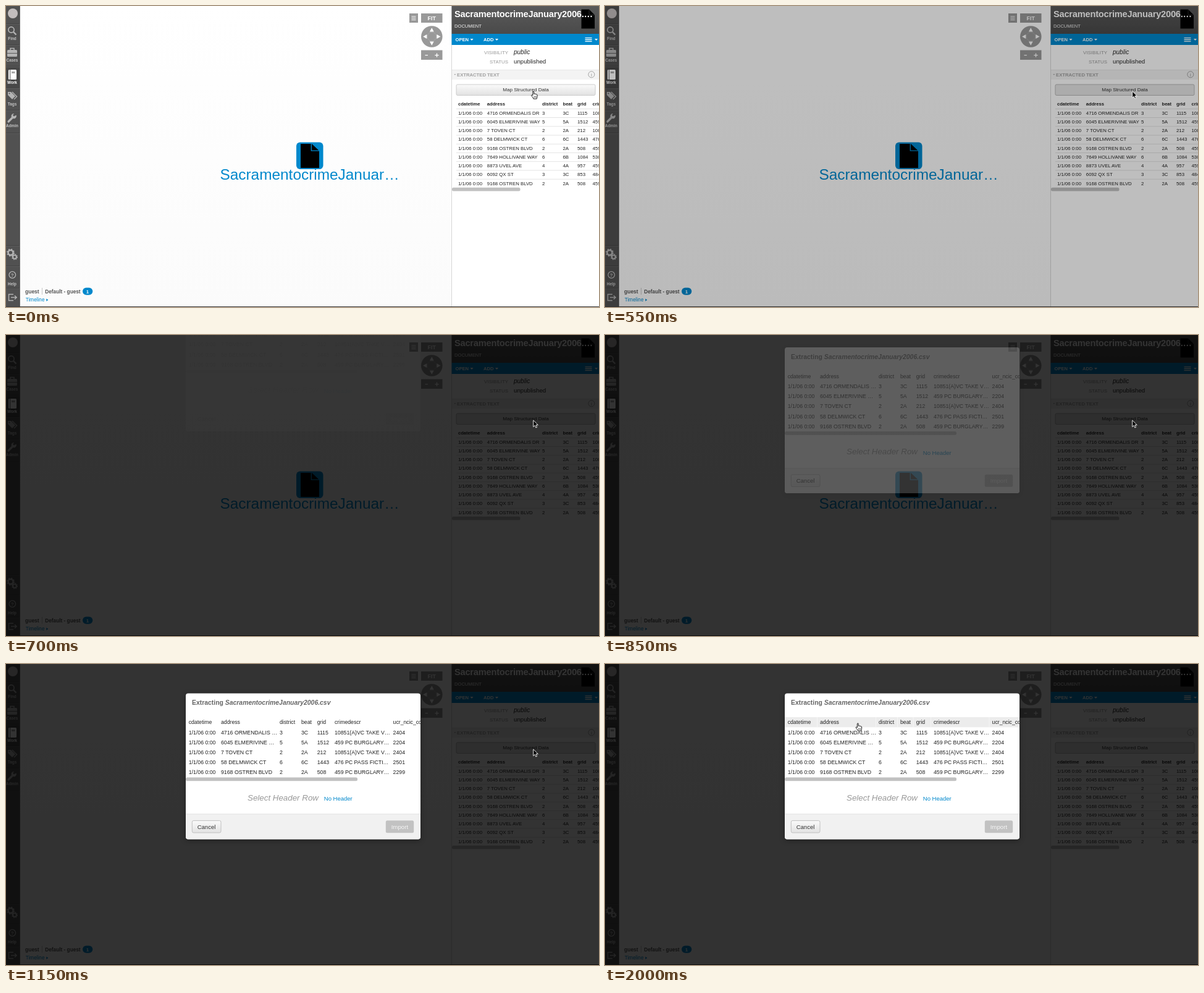
Animation, 960 px wide and 487 px high, one loop 2.05 s. Source, as an HTML page:

```html
<!DOCTYPE html>
<html lang="en">
<head>
<meta charset="utf-8">
<title>Map structured data</title>
<style>
html, body { margin: 0; width: 100%; height: 100%; overflow: hidden; background: #fdfdfd; }
svg { display: block; font-family: "Liberation Sans", Arial, sans-serif; }
text { white-space: pre; }
#modal { filter: drop-shadow(0 2px 4px rgba(0,0,0,.35)); }
</style>
</head>
<body>
<svg id="stage" width="960" height="487" viewBox="0 0 960 487">
  <defs>
    <linearGradient id="head" x2="0" y2="1"><stop stop-color="#5a5a5a"/><stop offset="1" stop-color="#4a4a4a"/></linearGradient>
    <linearGradient id="btn" x2="0" y2="1"><stop stop-color="#fafafa"/><stop offset="1" stop-color="#e2e2e2"/></linearGradient>
    <linearGradient id="paper" x2="0" y2="1"><stop stop-color="#fff"/><stop offset="1" stop-color="#fbfbfb"/></linearGradient>
    <clipPath id="sheet"><rect x="291" y="47.5" width="380" height="236" rx="4"/></clipPath>
  </defs>
  <g id="page"></g>
  <rect id="shade" width="960" height="487" opacity="0"/>
  <g id="modal" opacity="0"><g id="body" clip-path="url(#sheet)"></g></g>
  <g id="arrow">
    <path d="M0 0V10.6L2.5 8.3L4.1 12L5.9 11.2L4.3 7.6H7.6Z" fill="#000" stroke="#fff" stroke-width=".9"/>
  </g>
  <g id="hand">
    <path d="M-.9 .9C-.9-.4 1-.4 1 .9V4.4C1.6 3.6 2.7 3.9 2.8 4.6C3.5 4 4.5 4.3 4.6 5.1C5.4 4.7 6.3 5.1 6.3 6V8.4C6.3 10 5.5 10.6 5.4 12.2H.2C0 10.6-1.6 9.4-3 7.2C-3.6 6.1-2.4 5.4-1.6 6.2L-.9 6.9Z" fill="#fff" stroke="#000" stroke-width=".9"/>
    <path d="M1.2 8V10.4M2.8 8V10.4M4.4 8V10.4" stroke="#000" stroke-width=".6"/>
  </g>
</svg>
<script>
const $ = id => document.getElementById(id);
const BLUE = '#0088cc';

const text = (x, y, str, size, fill = '#222', more = '') =>
  `<text x="${x}" y="${y}" font-size="${size}" fill="${fill}" ${more}>${str}</text>`;
const rect = (x, y, w, h, fill, more = '') =>
  `<rect x="${x}" y="${y}" width="${w}" height="${h}" fill="${fill}" ${more}/>`;
const path = (d, fill = 'none', more = '') => `<path d="${d}" fill="${fill}" ${more}/>`;
const circle = (x, y, r, fill = 'none', more = '') =>
  `<circle cx="${x}" cy="${y}" r="${r}" fill="${fill}" ${more}/>`;
const caret = (x, y, fill) => path(`M${x} ${y}h5l-2.5 3z`, fill);
const line = (color, width = 1) => `stroke="${color}" stroke-width="${width}"`;
const BOLD = 'font-weight="bold"';
const MID = 'text-anchor="middle"';
const END = 'text-anchor="end"';
const ITALIC = 'font-style="italic"';

// address, district, beat, grid, crime, code
const rows = [
  ['4716 ORMENDALIS DR', 3, '3C', 1115, '10851(A)VC TAKE V…', 2404],
  ['6045 ELMERIVINE WAY', 5, '5A', 1512, '459 PC BURGLARY…', 2204],
  ['7 TOVEN CT', 2, '2A', 212, '10851(A)VC TAKE V…', 2404],
  ['58 DELMWICK CT', 6, '6C', 1443, '476 PC PASS FICTI…', 2501],
  ['9168 OSTREN BLVD', 2, '2A', 508, '459 PC BURGLARY…', 2299],
  ['7649 HOLLIVANE WAY', 6, '6B', 1084, '530 PC'],
  ['8873 UVEL AVE', 4, '4A', 957, '459 PC'],
  ['6092 QX ST', 3, '3C', 853, '484 PC'],
  ['9168 OSTREN BLVD', 2, '2A', 508, '459 PC']
].map(r => ['1/1/06 0:00', ...r]);
const heads = ['cdatetime', 'address', 'district', 'beat', 'grid', 'crimedescr', 'ucr_ncic_code'];

const cells = (list, xs, y, size, more) =>
  xs.map((x, i) => text(x, y, list[i], size, '#222', more)).join('');

function sidebar() {
  const g = '#b4b4b4';
  let s = rect(0, 0, 22.5, 487, '#515151') + rect(21.5, 0, 1, 487, '#444');
  s += rect(0, 97, 22, 35, '#474747');
  for (const y of [28, 62, 97, 132, 168, 205, 387, 420, 456])
    s += rect(0, y, 22, 1, '#434343') + rect(0, y + 1, 22, 1, '#5c5c5c');
  s += circle(11, 12, 8, '#c2bdbd');
  s += circle(8.5, 38.5, 4.6, 'none', line(g, 1.7)) + path('M12 42l4.5 4.5', 'none', line(g, 2.4));
  s += rect(2, 71, 16, 11, g, 'rx="1.5"') + path('M7 71v-2.5h6v2.5', 'none', line(g, 1.5)) +
    path('M2 76.5h16', 'none', line('#515151', .9));
  s += rect(4, 103, 13, 16, '#fff', 'rx="1.5"') + path('M6.6 103v16', 'none', line('#474747', .9)) +
    rect(9, 106, 5.5, 3, '#aaa');
  s += path('M3 139h5l7 7-5 5-7-7z', g) + path('M10 139l7.5 7.5-4.5 4.5', 'none', line(g, 1.4)) +
    circle(5.5, 141.5, 1, '#515151');
  s += path('M4 187l7-7', 'none', line(g, 3.2) + ' stroke-linecap="round"') +
    path('M16.6 176.5a4.2 4.2 0 1 1-3.6-2.6l-2 2.6 1.8 2z', g);
  s += circle(7.5, 399, 4, 'none', line(g, 2.4)) + circle(7.5, 399, 5.6, 'none', line(g, 1.6) + ' stroke-dasharray="2.2 2.2"');
  s += circle(14, 406, 2.9, 'none', line(g, 1.9)) + circle(14, 406, 4.3, 'none', line(g, 1.3) + ' stroke-dasharray="1.7 1.7"');
  s += circle(10.3, 435, 5.3, 'none', line(g, 1.3)) + text(10.3, 438, '?', 8, g, BOLD + MID.padStart(25));
  s += path('M12 466.5H4.5v10H12', 'none', line(g, 1.4)) + path('M8 471.5h9m-3-3l3.2 3-3.2 3', 'none', line(g, 1.4));
  const names = { Find: 54.5, Cases: 90, Work: 125.5, Tags: 160.5, Admin: 196, Help: 452 };
  for (const n in names)
    s += text(10, names[n], n, 6.4, n === 'Work' ? '#fff' : '#c4c4c4', `${BOLD} ${MID}`);
  return s;
}

function board() {
  const g = '#999';
  let s = rect(22, 0, 700, 487, 'url(#paper)');
  s += rect(653, 12, 14, 15, g) + path('M656.5 17h7m-7 2.7h7m-7 2.7h7', 'none', line('#fff'));
  s += rect(672, 12, 34.5, 15, g) + text(689.2, 22.8, 'FIT', 8.8, '#fff', `${BOLD} ${MID}`);
  s += circle(689.3, 49.5, 17.3, g) + circle(689.3, 49.5, 7.2, 'none', line('#ababab', 1));
  for (let a = 0; a < 360; a += 90)
    s += path('M689.3 35.3l3.4 6.2h-6.8z', '#fff', `transform="rotate(${a} 689.3 49.5)"`);
  s += rect(672, 71.5, 34.5, 15.5, g) + path('M678.5 79.6h4.4m11.4 0h6.4m-3.2-3.2v6.4', 'none', line('#fff', 1.4));
  s += rect(470, 220.5, 43.5, 43.5, BLUE, 'rx="6"') + path('M477 223h18l12 11.5v27.5h-30z', '#000') +
    path('M494.3 223v11.2h12.6', 'none', line(BLUE, 1.3)) + path('M495.6 224v9h10z', '#000');
  s += text(491.5, 281.3, 'SacramentocrimeJanuar…', 24.4, BLUE, MID);
  s += text(31, 465, 'guest', 8.5, '#555', BOLD) + rect(58, 456, .8, 11, '#bbb') +
    text(63.3, 465, 'Default - guest', 8.25, '#555', BOLD);
  s += rect(124, 455.8, 16.3, 11.6, BLUE, 'rx="5.8"') + text(132, 464.7, '1', 8, '#fff', `${BOLD} ${MID}`);
  s += text(31.8, 478.4, 'Timeline', 8.2, BLUE) + path('M65.3 473.4v4.4l3-2.2z', BLUE);
  return s;
}

function panel() {
  let s = rect(721, 0, 239, 487, '#fff') + rect(721, 0, .8, 487, '#ccc');
  s += rect(721.5, 0, 238.5, 45, 'url(#head)');
  s += path('M931.5 5.5h12.5l9 9v22h-21.5z', '#000') + path('M944 6v8.5h8.5', 'none', line('#333', .8));
  s += text(726, 18.3, 'SacramentocrimeJanuary2006.…', 14.6, '#fff', BOLD + ' letter-spacing="-.2"');
  s += text(726, 35.2, 'DOCUMENT', 7.6, '#f2f2f2');
  s += rect(721.5, 45, 238.5, 18, BLUE);
  s += text(727.5, 57, 'OPEN', 7.6, '#fff', BOLD) + caret(751.5, 53, '#fff');
  s += text(773, 57, 'ADD', 7.6, '#fff', BOLD) + caret(792, 53, '#fff');
  s += path('M937.5 51.6h11m-11 2.9h11m-11 2.9h11', 'none', line('#fff', 1.3)) + caret(953, 53, '#fff');
  s += text(813, 77.8, 'VISIBILITY', 7.9, '#999', END) + text(822, 78.2, 'public', 10, '#222', ITALIC);
  s += text(813, 92.8, 'STATUS', 7.9, '#999', END) + text(822, 93.2, 'unpublished', 9.7);
  s += rect(722, 103, 238, 16, '#f3f3f3') + rect(722, 103, 238, .7, '#e2e2e2');
  s += path('M725.3 110h3l-1.5 2z', '#aaa') + text(730, 114, 'EXTRACTED TEXT', 7.7, '#a0a0a0', BOLD);
  s += circle(947.8, 110.8, 5, 'none', line('#999', .9)) + text(947.8, 113.7, 'i', 8, '#888', MID);
  s += '<rect id="map" x="729" y="127" width="225" height="17.5" rx="2" stroke-width=".9"/>';
  s += text(841.5, 138.3, 'Map Structured Data', 8.1, '#333', MID);
  const xs = [732, 778.8, 868, 901.5, 925, 949.5];
  s += cells(heads, xs, 161.2, 7.6, BOLD);
  rows.forEach((r, i) => {
    const y = 175.8 + i * 14.22;
    s += rect(729, y - 9.8, 231, .8, '#ddd') + cells(r, xs, y, 7.8);
  });
  s += rect(722, 293.8, 110.5, 5.6, '#c1c1c1', 'rx="2.5"');
  return s;
}

function dialog() {
  const xs = [295.7, 348, 443, 478, 503.7, 532, 626.6];
  let s = rect(291, 47, 380, 237, '#fff');
  s += text(301, 66, 'Extracting <tspan font-style="italic">SacramentocrimeJanuary2006.csv</tspan>', 10.42, '#666', BOLD);
  s += '<g id="hover">' + rect(291, 86, 380, 16.3, '#ececec');
  for (const x of xs.slice(1)) s += rect(x - 5, 86, .8, 16.3, '#f8f8f8');
  s += '</g>' + cells(heads, xs, 97.1, 8.7);
  rows.slice(0, 5).forEach((r, i) => {
    const short = [...r];
    if (i < 2) short[1] = r[1].replace(/ \w+$/, ' …');
    s += cells(short, xs, 113.5 + i * 16.2, 8.75);
  });
  s += rect(291, 183.6, 278, 5.6, '#c1c1c1', 'rx="2.5"');
  s += text(391, 220.7, 'Select Header Row', 13.35, '#999', ITALIC) + text(514.8, 221, 'No Header', 9.5, BLUE);
  s += rect(291, 242.5, 380, 42, '#f1f1f1') + rect(291, 242.5, 380, .8, '#ddd');
  s += rect(301.3, 253.4, 46.7, 19.6, 'url(#btn)', 'rx="2.5" ' + line('#bbb', .9)) +
    text(324.5, 266.6, 'Cancel', 9.5, '#333', MID);
  s += rect(614.8, 253.2, 45.4, 20, '#c2c2c2', 'rx="2.5"') + text(637.4, 266.6, 'Import', 9.7, '#f6f6f6', MID);
  return s;
}

$('page').innerHTML = board() + sidebar() + panel() + rect(0, 486, 960, 1, '#3c3c3c');
$('body').innerHTML = dialog();

const clamp = v => Math.max(0, Math.min(1, v));

// CSS-style timing curve, solved by bisection
function bezier(x1, y1, x2, y2) {
  const at = (u, a, b) => 3 * u * (1 - u) * (1 - u) * a + 3 * u * u * (1 - u) * b + u ** 3;
  return x => {
    let lo = 0, hi = 1;
    for (let i = 0; i < 24; i++) {
      const m = (lo + hi) / 2;
      at(m, x1, x2) < x ? lo = m : hi = m;
    }
    return at(lo, y1, y2);
  };
}
const easeOut = bezier(0, 0, .58, 1);
const easeIn = bezier(.42, 0, 1, 1);

// time, x, y of the pointer tip
const route = [
  [1150, 853.7, 138], [1400, 850, 136], [1550, 832, 126], [1650, 787, 104],
  [1700, 738, 101], [1750, 672, 98], [1800, 585, 96], [1850, 508, 95],
  [1900, 453, 95], [1950, 421, 95], [2000, 409.3, 96]
];
function pointer(t) {
  if (t <= route[0][0]) return route[0].slice(1);
  const i = route.findIndex(p => p[0] >= t);
  const [t0, x0, y0] = route[i - 1], [t1, x1, y1] = route[i];
  const k = (t - t0) / (t1 - t0);
  return [x0 + (x1 - x0) * k, y0 + (y1 - y0) * k];
}

const LOOP = 2050, STEP = 50, CLICK = 300, FADE = 502, OPEN = 652;

function draw(t) {
  const clicked = t >= CLICK;
  $('map').setAttribute('fill', clicked ? '#e6e6e6' : 'url(#btn)');
  $('map').setAttribute('stroke', clicked ? '#b2b2b2' : '#c8c8c8');

  $('shade').setAttribute('opacity', .8 * clamp((t - FADE) / 150));
  const drop = -170 * (1 - easeOut(clamp((t - OPEN) / 300)));
  $('modal').setAttribute('transform', `translate(0 ${drop})`);
  $('modal').setAttribute('opacity', t < OPEN ? 0 : easeIn(clamp((t - OPEN) / 498)));

  const [x, y] = pointer(t);
  const over = x < 671;
  const hand = !clicked || over;
  $('hover').style.display = over ? '' : 'none';
  $('hand').style.display = hand ? '' : 'none';
  $('arrow').style.display = hand ? 'none' : '';
  $(hand ? 'hand' : 'arrow').setAttribute('transform', `translate(${x} ${y})`);
}

const start = performance.now();
function tick() {
  const t = (performance.now() - start) % LOOP;
  draw(Math.floor(t / STEP) * STEP);
  requestAnimationFrame(tick);
}
draw(0);
requestAnimationFrame(tick);
</script>
</body>
</html>
```
